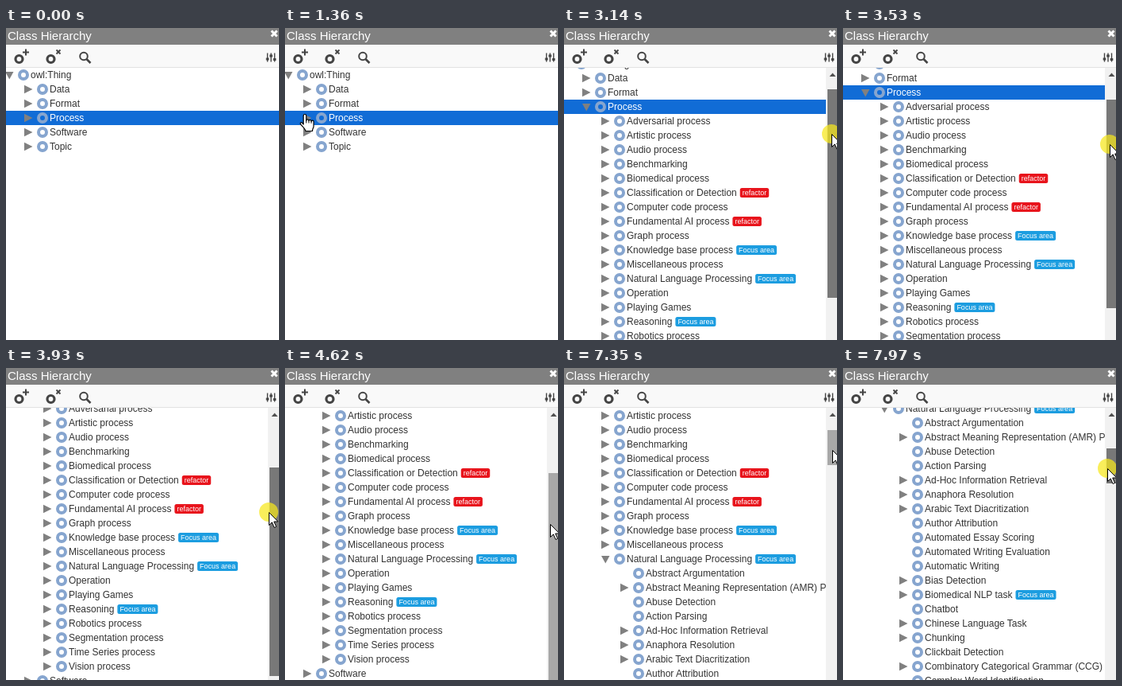
An HTML page for the animation above (8 s loop, 344 px wide and 392 px high).

```html
<!DOCTYPE html>
<html lang="en">
<head>
<meta charset="utf-8">
<title>Class Hierarchy</title>
<style>
html, body { margin: 0; width: 100%; height: 100%; overflow: hidden; background: #fff; }
svg { display: block; width: 344px; height: 392px; font: 12px "Liberation Sans", Arial, sans-serif; cursor: default; }
</style>
</head>
<body>
<svg id="stage" viewBox="0 0 344 392">
  <rect width="344" height="392" fill="#fff"/>
  <rect id="hover" width="330" height="18" fill="#f0f0f0"/>
  <rect id="selected" height="18" fill="#116cd6"/>
  <g id="tree"></g>
  <g id="bar">
    <rect x="330" y="50" width="14" height="342" fill="#f1f1f1"/>
    <path d="M334.500 61h8l-4-4.500z" fill="#505050"/>
    <rect id="thumb" x="332" width="12"/>
  </g>
  <rect width="344" height="21" fill="#808080"/>
  <text x="2" y="15" font-size="15" fill="#fff">Class Hierarchy</text>
  <path d="M334.500 3.500l7 7m0-7l-7 7" stroke="#fff" stroke-width="3"/>
  <rect y="21" width="344" height="29" fill="#f9f9f9"/>
  <rect y="49" width="344" height="1" fill="#e2e2e2"/>
  <g fill="none" stroke="#444">
    <circle cx="16.500" cy="39" r="4.500" stroke-width="3.200"/>
    <path d="M21 30.500h8m-4-4v8" stroke-width="2"/>
    <circle cx="56.500" cy="39" r="4.500" stroke-width="3.200"/>
    <path d="M63.500 27.500l5 5m0-5l-5 5" stroke-width="1.800"/>
    <circle cx="98" cy="35.500" r="4.800" stroke-width="2"/>
    <path d="M101.500 39l5 5" stroke-width="2.600"/>
    <path d="M329.500 31.500v11m4.500-11v11m4.500-11v11" stroke-width="1.400"/>
    <path d="M327.700 39h3.600m.9-4h3.600m.9 4.500h3.600" stroke-width="3"/>
  </g>
  <circle id="halo" r="12" fill="#f7e71c" opacity=".72"/>
  <g id="pointer" fill="#fff" stroke="#000" stroke-linejoin="round">
    <path id="arrow" d="M.5 .5V16.500l3.700-3.600 2.900 6.600 2.500-1.100-2.900-6.400h5.100z"/>
    <g id="hand" transform="translate(-6.300 0)">
      <path stroke-width="1.200" d="M4.500 13V2.300a1.800 1.800 0 0 1 3.600 0V8.200a1.600 1.600 0 0 1 3.200 .4a1.600 1.600 0 0 1 3.100 .7a1.500 1.500 0 0 1 3 .7V15.500c0 2-1.600 3-1.600 6H7.200C7 18.500 3 16 .8 12.600c-.8-1.500 1-2.600 2.200-1.400z"/>
      <path fill="none" d="M8.100 8v3.500m3.200-3v3m3.100-2.500v2.800"/>
    </g>
  </g>
</svg>
<script>
const $ = id => document.getElementById(id);
const LOOP = 8000, ROW = 18, TOP = 50, VIEW = 361, TRACK = VIEW - 34;
const EXPAND = 1840, EXPAND_NLP = 6030;
const TOTAL_ROWS = [6, 25, 149];

// A leading "-" marks a leaf; a trailing "*" or "!" adds a badge.
const processes = `Adversarial process|Artistic process|Audio process|Benchmarking|Biomedical process|Classification or Detection!|Computer code process|Fundamental AI process!|Graph process|Knowledge base process*|Miscellaneous process|Natural Language Processing*|Operation|Playing Games|Reasoning*|Robotics process|Segmentation process|Time Series process|Vision process`.split('|');
const nlpTasks = `-Abstract Argumentation|Abstract Meaning Representation (AMR) Parsing|-Abuse Detection|-Action Parsing|Ad-Hoc Information Retrieval|Anaphora Resolution|Arabic Text Diacritization|-Author Attribution|-Automated Essay Scoring|-Automated Writing Evaluation|-Automatic Writing|Bias Detection|Biomedical NLP task*|-Chatbot|Chinese Language Task|Chunking|-Clickbait Detection|Combinatory Categorical Grammar (CCG)|-Complex Word Identification`.split('|');
const badges = { '!': ['refactor', '#e8141c'], '*': ['Focus area', '#1c9de0'] };

function add(parent, tag, attrs, text) {
  const el = document.createElementNS('http://www.w3.org/2000/svg', tag);
  for (const key in attrs) el.setAttribute(key, attrs[key]);
  if (text) el.textContent = text;
  parent.appendChild(el);
  return el;
}

const rows = [];

// A row shows from stage `from` on, and its triangle points down from stage `opens` on.
function addRow(label, level, from = 0, opens = 9) {
  const leaf = label[0] === '-', badge = badges[label.slice(-1)];
  const name = label.replace(/^-|[*!]$/g, '');
  const g = add($('tree'), 'g', {}), x = level * 24;
  const mark = leaf ? null : add(g, 'path', { fill: '#808080' });
  add(g, 'circle', { cx: x + 22, cy: 9, r: 5, fill: 'none', stroke: '#86a5cf', 'stroke-width': 4 });
  const text = add(g, 'text', { x: x + 31, y: 13, fill: name === 'Process' ? '#fff' : '#333' }, name);
  if (badge) {
    const left = x + 35 + text.getComputedTextLength();
    const label = add(g, 'text', { x: left + 3, y: 12, 'font-size': 9, fill: '#fff' }, badge[0]);
    const box = add(g, 'rect', { x: left, y: 3, width: label.getComputedTextLength() + 6, height: 12, rx: 2.5, fill: badge[1] });
    g.insertBefore(box, label);
  }
  rows.push({ g, mark, x, from, opens });
}

addRow('owl:Thing', 0, 0, 0);
addRow('Data', 1);
addRow('Format', 1);
addRow('Process', 1, 0, 1);
for (const name of processes) {
  const isNlp = name.startsWith('Natural');
  addRow(name, 2, 1, isNlp ? 2 : 9);
  if (isNlp) nlpTasks.forEach(task => addRow(task, 3, 2));
}
addRow('Software', 1);
addRow('Topic', 1);

// start, end, steps, from, to, linear
const moves = [
  [670, 1130, 7, [203, 128], [25, 107]],
  [1360, 1520, 3, [25, 107], [24, 111]],
  [2070, 2450, 6, [24, 111], [310, 159]],
  [2530, 2760, 4, [310, 159], [337, 123]],
  [2910, 3530, 9, [337, 123], [336, 146], true],
  [3600, 3700, 2, [336, 146], [334, 160], true],
  [3780, 3930, 3, [334, 160], [331, 181], true],
  [4010, 4240, 4, [331, 181], [332, 190], true],
  [4390, 4620, 4, [332, 190], [334, 196]],
  [4870, 5480, 9, [334, 196], [47, 238]],
  [6410, 7030, 9, [47, 238], [339, 104]],
  [7350, 7350, 1, [339, 104], [338, 103]],
  [7650, 7970, 5, [338, 103], [333, 126], true]
];
const presses = [[1750, 1840], [2910, 4390], [5860, 6030], [7500, LOOP]];

function pointerAt(t) {
  const move = moves.filter(m => t >= m[0]).pop();
  if (!move) return null;
  const [start, end, n, a, b, linear] = move;
  const step = (end - start) / (n - 1) || 1;
  const k = Math.min(n - 1, Math.floor((t - start) / step + 0.15));
  const p = (k + 1) / n, e = linear ? p : p * p * (3 - 2 * p);
  return a.map((v, i) => v + (b[i] - v) * e);
}

function scrollAt(t, y, height) {
  const perPixel = height / TRACK;
  if (t < 2910) return 0;
  if (t < 4390) return Math.min(89, Math.round((y - 123) * perPixel));
  return t < 7500 ? 89 : Math.round(89 + (y - 103) * perPixel);
}

const show = (el, on) => el.setAttribute('visibility', on ? 'inherit' : 'hidden');

function draw(t) {
  const stage = t < EXPAND ? 0 : t < EXPAND_NLP ? 1 : 2;
  const height = TOTAL_ROWS[stage] * ROW;
  const at = pointerAt(t), [px, py] = at || [0, 0];
  const pressed = presses.some(([a, b]) => t >= a && t < b);
  const scroll = scrollAt(t, py, height);

  let index = 0;
  for (const { g, mark, x, from, opens } of rows) {
    const on = stage >= from;
    show(g, on);
    if (!on) continue;
    g.setAttribute('transform', `translate(0 ${TOP + index++ * ROW - scroll})`);
    if (mark) mark.setAttribute('d', stage >= opens ? `M${x - 1} 5h10.500l-5.250 9.500z` : `M${x - 1} 3.700v10.600l10.500-5.300z`);
  }

  $('selected').setAttribute('y', TOP + 3 * ROW - scroll);
  $('selected').setAttribute('width', stage ? 330 : 344);

  show($('hover'), stage && px < 330);
  $('hover').setAttribute('y', TOP - scroll + Math.floor((py - TOP + scroll) / ROW) * ROW);

  const top = Math.round(67 + scroll * TRACK / height);
  const length = Math.round(TRACK * VIEW / height);
  const over = px >= 330 && py >= top && py < top + length;
  show($('bar'), stage);
  $('thumb').setAttribute('y', top);
  $('thumb').setAttribute('height', length);
  $('thumb').setAttribute('fill', over ? (pressed ? '#787878' : '#a8a8a8') : '#c1c1c1');

  const place = `translate(${Math.round(px)} ${Math.round(py)})`;
  const hand = px < (stage ? 60 : 36);
  show($('pointer'), at);
  show($('arrow'), !hand);
  show($('hand'), hand);
  show($('halo'), pressed);
  $('pointer').setAttribute('transform', place);
  $('halo').setAttribute('transform', place);
}

const begin = performance.now();
function tick() {
  draw((performance.now() - begin) % LOOP);
  requestAnimationFrame(tick);
}
tick();
</script>
</body>
</html>
```
